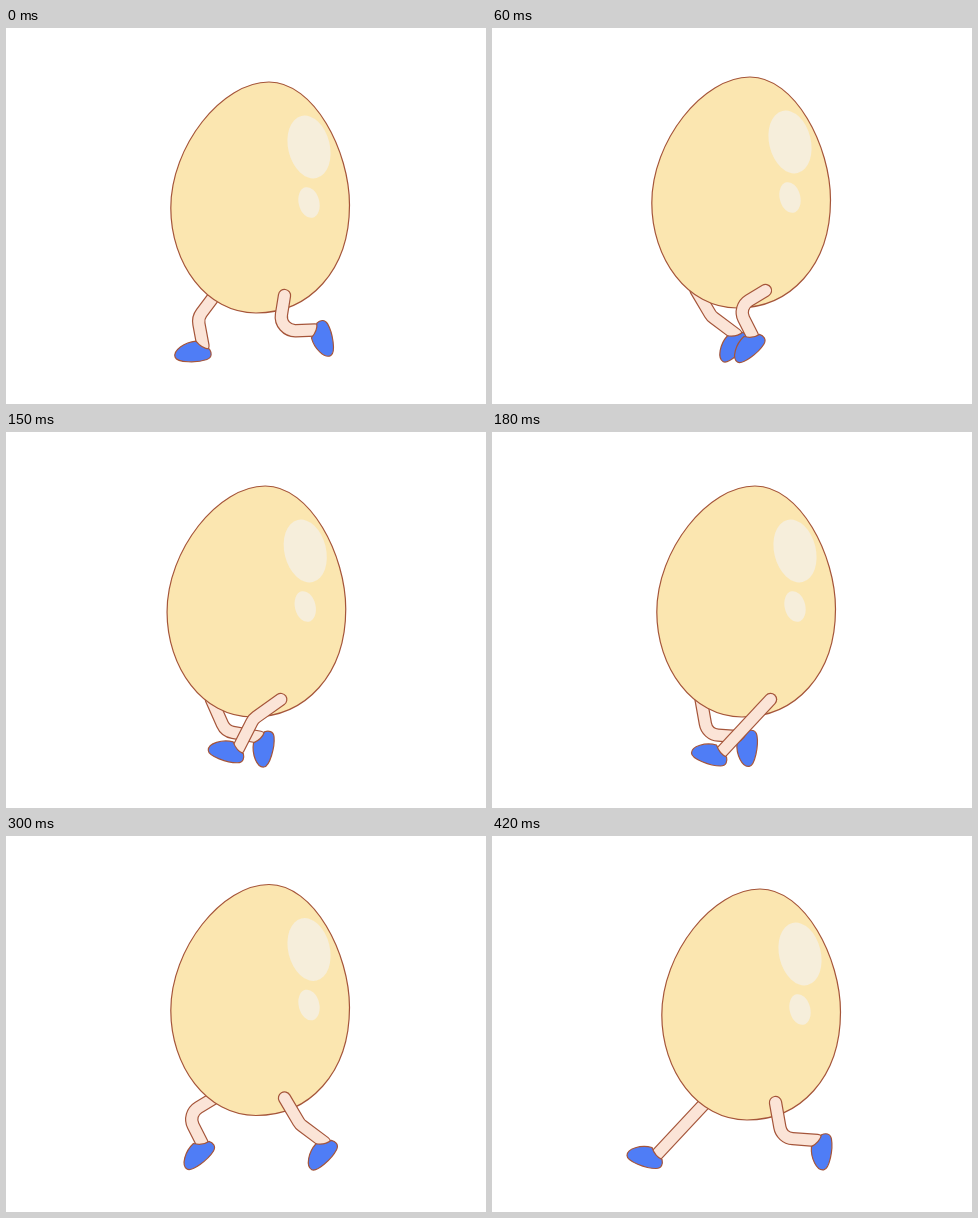
Animation, 480 px wide and 376 px high, one loop 0.48 s. Source, as an HTML page with a canvas:

```html
<!DOCTYPE html>
<html lang="en">
<head>
<meta charset="utf-8">
<title>Running egg</title>
<style>
  html, body { margin: 0; width: 100%; height: 100%; overflow: hidden; background: #fff; }
  canvas { display: block; width: 480px; height: 376px; }
</style>
</head>
<body>
<canvas id="stage" width="480" height="376"></canvas>
<script>
const ctx = document.getElementById('stage').getContext('2d');
const LOOP = 480, BEAT = 60;
const LINE = '#a5553a', SHELL = '#fbe6b0', SHINE = '#f6eedb', SKIN = '#fbe4d7', SHOE = '#4f7df6';
const FRONT_HIP = [278.5, 267.5], BACK_HIP = [209, 267];

const eggPath = new Path2D('M263 54C308 54 343.5 123 343.5 177C343.5 243 303 285 250 285C200 285 164.8 235 164.8 180C164.8 118 216 54 263 54Z');
// Shoe with the ankle at the origin and the toe pointing left.
const shoePath = new Path2D('M-5 -7C-16 -10 -30 -6 -30 1C-30 7 -11 14 -1 14C5 14 6 9 5 5Q-2 2 -5 -7Z');

// One stride, a key per beat: ankle x, ankle y (from the hip), knee bend, shoe angle.
const stride = [
  [30.5, 34.5, 28, -120], [-13, 45.5, 22, -58], [-36, 46, 16, -2], [-49, 52.5, 0, 0],
  [-12, 51, 11.5, -20], [40, 44.5, 6, -63], [55.5, 38.5, 11, -91], [42, 38, 22, -100]
];
// Body offset on the same beats.
const sway = [[0, 0], [-5, -5], [-7.5, 0], [0, 0], [0, -2], [0, -5.5], [0, -7.5], [5, -1]];

function sample(keys, time) {
  const beat = time / BEAT, i = Math.floor(beat), mix = beat - i;
  const next = keys[(i + 1) % keys.length];
  return keys[i % keys.length].map((v, n) => v + (next[n] - v) * mix);
}

// The picture holds for whole beats; the first and third are split in two.
function hold(time) {
  const beat = Math.floor(time / BEAT);
  const split = beat === 0 || beat === 2;
  const step = split ? BEAT / 2 : BEAT;
  return Math.floor(time / step) * step;
}

function paint(path, fill) {
  ctx.fillStyle = fill;
  ctx.fill(path);
  ctx.strokeStyle = LINE;
  ctx.lineWidth = 1.2;
  ctx.stroke(path);
}

function drawLeg([hx, hy], time) {
  const [x, y, bend, angle] = sample(stride, time);
  const reach = Math.hypot(x, y);
  const kneeX = x / 2 - bend * y / reach;
  const kneeY = y / 2 + bend * x / reach;
  const leg = new Path2D();
  leg.moveTo(0, 0);
  leg.arcTo(kneeX, kneeY, x, y, 14);
  leg.lineTo(x, y);

  ctx.save();
  ctx.translate(hx, hy);
  ctx.lineCap = 'round';
  for (const [width, color] of [[13.4, LINE], [11, SKIN]]) {
    ctx.lineWidth = width;
    ctx.strokeStyle = color;
    ctx.stroke(leg);
  }
  ctx.translate(x, y);
  ctx.rotate(angle * Math.PI / 180);
  paint(shoePath, SHOE);
  ctx.restore();
}

function drawShine(x, y, rx, ry) {
  ctx.fillStyle = SHINE;
  ctx.beginPath();
  ctx.ellipse(x, y, rx, ry, -0.24, 0, Math.PI * 2);
  ctx.fill();
}

function draw(time) {
  ctx.fillStyle = '#fff';
  ctx.fillRect(0, 0, 480, 376);
  ctx.save();
  ctx.translate(...sample(sway, time));
  drawLeg(BACK_HIP, time + LOOP / 2);
  paint(eggPath, SHELL);
  drawShine(303, 119, 20.8, 32);
  drawShine(303, 174.5, 10.3, 15.6);
  drawLeg(FRONT_HIP, time);
  ctx.restore();
}

const start = performance.now();
function tick() {
  draw(hold((performance.now() - start) % LOOP));
  requestAnimationFrame(tick);
}
tick();
</script>
</body>
</html>
```
